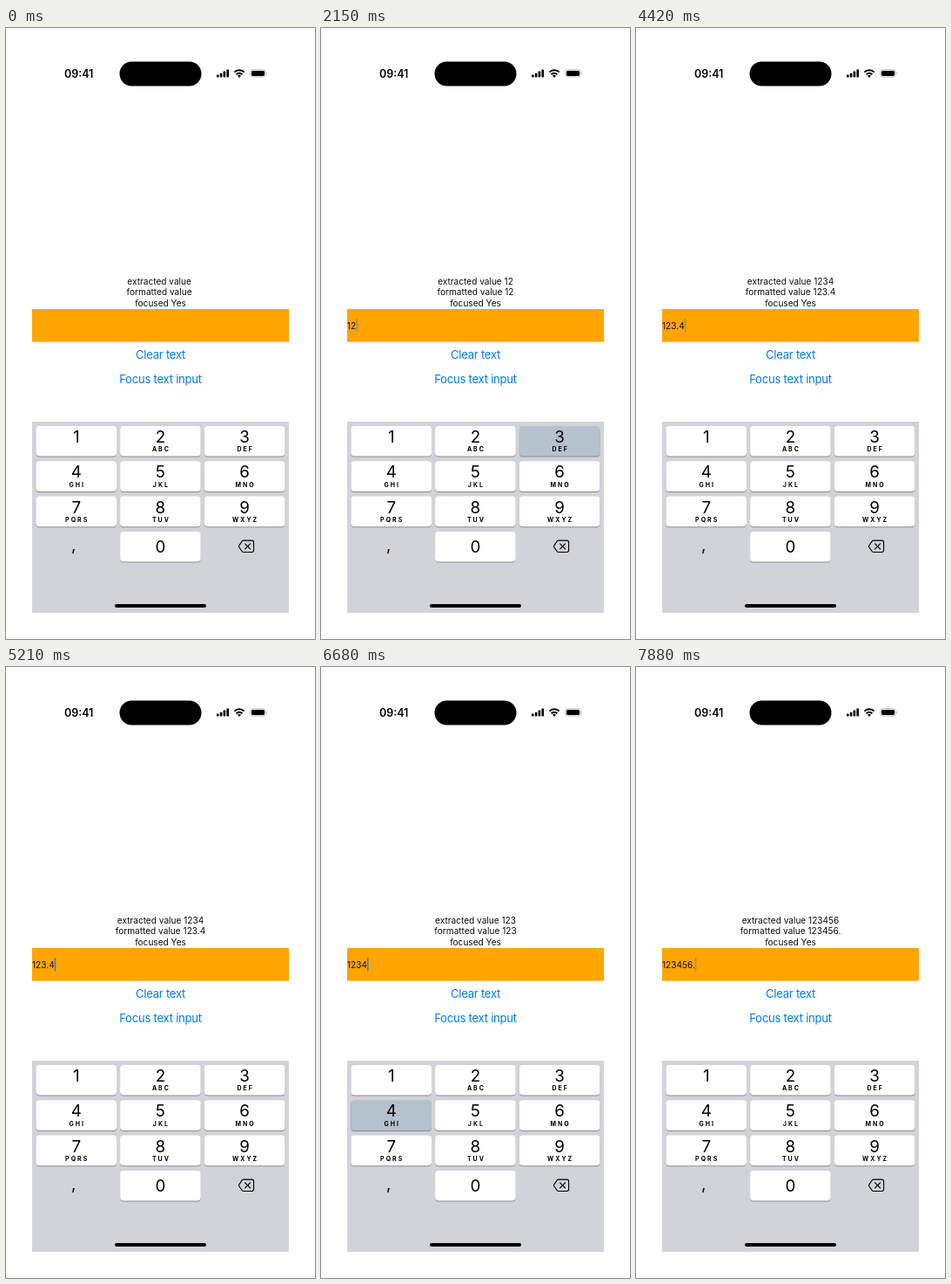
Write an HTML page that moves like this. It is 355 px wide and 700 px high and loops after 8000 ms.

```html
<!DOCTYPE html>
<html lang="en">
<head>
<meta charset="utf-8">
<title>Numeric input</title>
<style>
  html, body { margin: 0; width: 100%; height: 100%; overflow: hidden; background: #fff; }
  svg { display: block; width: 355px; height: 700px; font-family: Inter, "Liberation Sans", sans-serif; }
  text { white-space: pre; }
  .mid { text-anchor: middle; }
  .body { font-size: 10.1px; fill: #0c0c0c; }
  .link { font-size: 13.1px; letter-spacing: -.25px; fill: #007aeb; }
  .digit { font-size: 18.8px; }
  .letters { font-size: 7px; font-weight: 700; letter-spacing: 2px; }
</style>
</head>
<body>
<svg id="stage" viewBox="0 0 355 700">
  <text class="mid" x="83.7" y="56.6" font-size="12.5" font-weight="600">09:41</text>
  <rect x="130.5" y="38.5" width="94" height="28" rx="14"/>
  <g id="signal"></g>
  <g fill="none" stroke="#000" stroke-width="2">
    <path d="M262.4 50.6a8 8 0 0 1 11.2 0"/>
    <path d="M264.6 53.2a5 5 0 0 1 6.8 0"/>
  </g>
  <path d="M268 57l-2-2.2a2.9 2.9 0 0 1 4 0z"/>
  <rect x="280.7" y="47.7" width="17.6" height="8.4" rx="2.6" fill="none" stroke="#aaa" stroke-width=".8"/>
  <rect x="281.9" y="48.9" width="15.2" height="6" rx="1.6"/>
  <path d="M299.2 50.4q1.2 1.5 0 3z" fill="#aaa"/>

  <text class="mid body" id="extracted" x="177.5" y="293.7"></text>
  <text class="mid body" id="formatted" x="177.5" y="306.4"></text>
  <text class="mid body" x="177.5" y="319.1">focused Yes</text>

  <rect x="30" y="322" width="295" height="37.6" fill="#ffa500"/>
  <text class="body" id="field" x="30" y="344.7"></text>
  <rect id="caret" y="333" width="1.5" height="15.5" rx=".7" fill="#3478e0"/>

  <text class="mid link" x="177.5" y="378.8">Clear text</text>
  <text class="mid link" x="177.5" y="407">Focus text input</text>

  <rect x="30" y="451" width="295" height="219" fill="#d2d3d9"/>
  <g id="keys"></g>
  <text class="mid digit" x="77.6" y="599.4">,</text>
  <path id="del" d="M272.8 587.1h9.6q2.2 0 2.2 2.2v9q0 2.2-2.2 2.2h-9.6q-.8 0-1.4-.6l-3.7-5.2q-.6-.8 0-1.6l3.7-5.4q.6-.6 1.4-.6z" stroke="#000" stroke-width="1.1"/>
  <path id="cross" d="M274.6 590.8l6 6m0-6l-6 6" stroke-width="1.2" stroke-linecap="round"/>
  <rect x="125" y="660" width="105" height="4" rx="2"/>
</svg>
<script>
const LOOP = 8000;
const $ = id => document.getElementById(id);

function add(parent, tag, attrs, text = '') {
  const el = document.createElementNS('http://www.w3.org/2000/svg', tag);
  for (const name in attrs) el.setAttribute(name, attrs[name]);
  el.textContent = text;
  return parent.appendChild(el);
}

[2.8, 4.6, 6.8, 9].forEach((h, i) =>
  add($('signal'), 'rect', { x: 242 + i * 3.8, y: 56.4 - h, width: 2.6, height: h, rx: .7 }));

const keys = {};
function addKey(label, letters, col, row) {
  const x = 34.4 + col * 96.7, y = 456 + row * 40.3, mid = x + 46.3;
  const box = { x, y, width: 92.6, height: 34.6, rx: 4 };
  add($('keys'), 'rect', { ...box, y: y + 1, fill: '#898b90' });
  keys[label] = add($('keys'), 'rect', box);
  add($('keys'), 'text', { class: 'mid digit', x: mid, y: y + (row < 3 ? 18.9 : 23.8) }, label);
  add($('keys'), 'text', { class: 'mid letters', x: mid + 1, y: y + 29.4 }, letters);
}
['', 'ABC', 'DEF', 'GHI', 'JKL', 'MNO', 'PQRS', 'TUV', 'WXYZ'].forEach((s, i) =>
  addKey(String(i + 1), s, i % 3, Math.floor(i / 3)));
addKey('0', '', 1, 3);

// start ms, field text, formatted value, pressed key, caret opacity
const steps = [
  [0, '', '', '', 0],
  [200, '', '', '', .5],
  [320, '', '', '', 1],
  [870, '', '', '', .5],
  [980, '', '', '', 0],
  [1220, '', '', '', .5],
  [1340, '', '', '', 1],
  [1460, '1', '', '1', 1],
  [1750, '1', '1', '2', 1],
  [1880, '12', '12', '', 1],
  [2150, '12', '12', '3', .5],
  [2270, '123', '123', '', 1],
  [2720, '123.', '123', '', 1],
  [2840, '123.', '123.', '', 1],
  [3360, '123.', '123.', '4', 1],
  [3480, '123.4', '123.', '4', 1],
  [3820, '123.4', '123.4', '', 1],
  [3970, '123.4', '123.4', '', 0],
  [4420, '123.4', '123.4', '', .5],
  [4530, '123.4', '123.4', '', 1],
  [4770, '123.4', '123.4', '', .5],
  [4890, '123.4', '123.4', '', 0],
  [5080, '123.4', '123.4', '', .5],
  [5210, '123.4', '123.4', '', 1],
  [5510, '123.', '123.4', 'del', 1],
  [5660, '123.', '123.', '', 1],
  [5930, '123', '123.', 'del', 1],
  [6090, '123', '123', '', 1],
  [6440, '123', '123', '', 0],
  [6560, '123', '123', '4', 0],
  [6680, '1234', '123', '4', 1],
  [6930, '1234', '1234', '5', 1],
  [7070, '12345', '12345', '6', 1],
  [7320, '123456', '123456', '', 1],
  [7430, '123456.', '123456.', '', .5]
];

function draw(time) {
  const [, text, value, pressed, caret] = steps.findLast(s => s[0] <= time);
  $('extracted').textContent = 'extracted value ' + value.replace('.', '');
  $('formatted').textContent = 'formatted value ' + value;
  $('field').textContent = text;
  $('caret').setAttribute('x', 30 + (text ? $('field').getComputedTextLength() : 0));
  $('caret').setAttribute('opacity', caret);
  for (const k in keys) keys[k].setAttribute('fill', k === pressed ? '#b5c1cd' : '#fff');
  const deleting = pressed === 'del';
  $('del').setAttribute('fill', deleting ? '#000' : 'none');
  $('cross').setAttribute('stroke', deleting ? '#d2d3d9' : '#000');
}

const start = performance.now();
function tick() {
  draw((performance.now() - start) % LOOP);
  requestAnimationFrame(tick);
}
tick();
</script>
</body>
</html>
```
